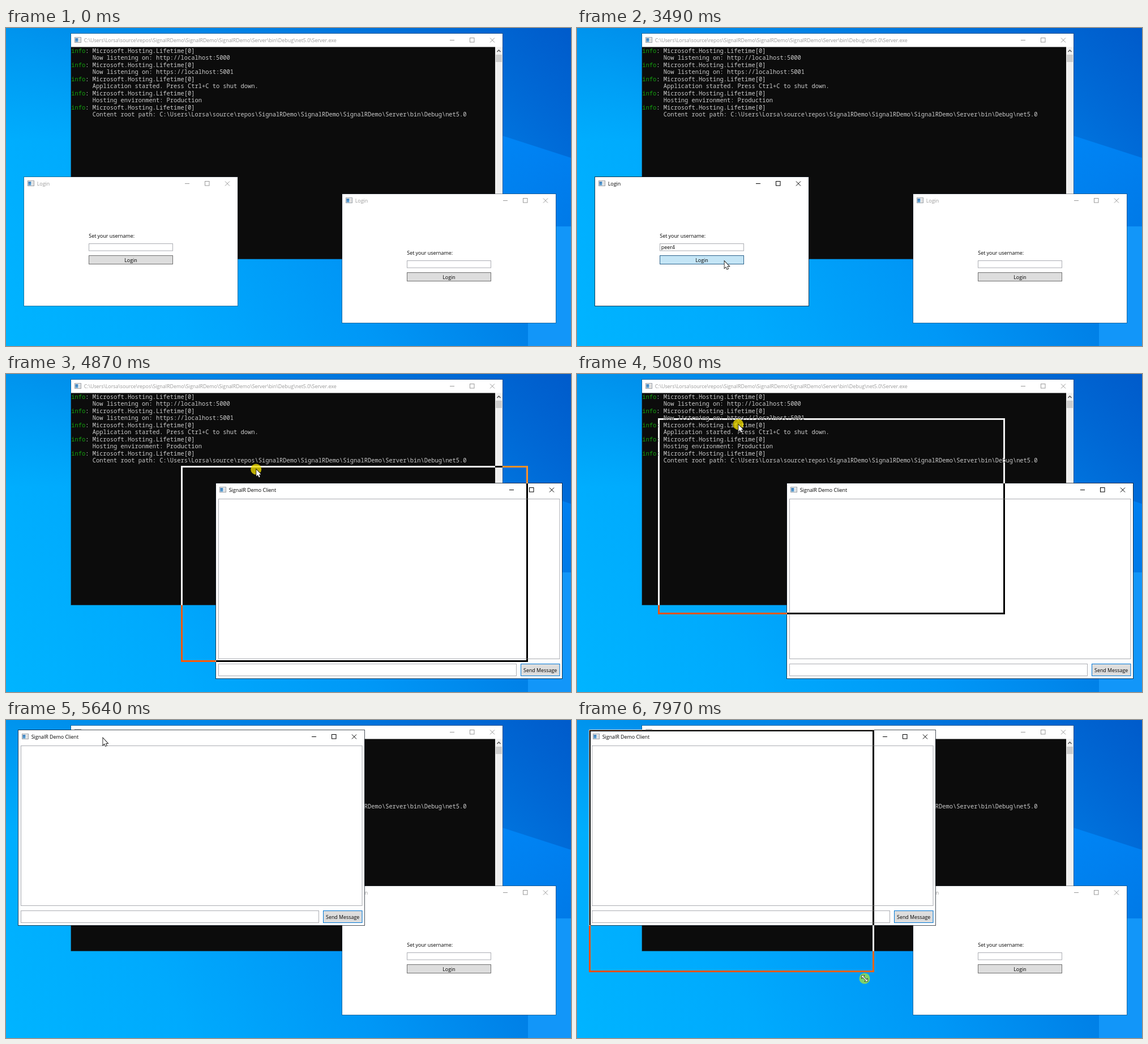
Recreate the animation shown at these times as an HTML page with a canvas. Size 998 by 561 pixels, loop 8 s.

```html
<!DOCTYPE html>
<html lang="en">
<head>
<meta charset="utf-8">
<title>SignalR demo</title>
<style>
html, body { margin: 0; width: 100%; height: 100%; overflow: hidden; background: #00a0f5; }
canvas { display: block; }
</style>
</head>
<body>
<canvas id="stage" width="998" height="561"></canvas>
<script>
const W = 998, H = 561, LOOP = 8000;
const ctx = document.getElementById('stage').getContext('2d');
const UI = '8.88px "Open Sans", "Noto Sans", sans-serif';
const MONO = '10.4px "Noto Sans Mono", "DejaVu Sans Mono", monospace';
const ROOT = 'C:\\Users\\Lorsa\\source\\repos\\' + 'SignalRDemo\\'.repeat(3) + 'Server\\bin\\Debug\\net5.0';
const LOG = [
  'Now listening on: http://localhost:5000',
  'Now listening on: https://localhost:5001',
  'Application started. Press Ctrl+C to shut down.',
  'Hosting environment: Production',
  'Content root path: ' + ROOT
];
const USER = 'peer4', KEY_GAP = 197;

// Moments of the story, in ms
const ENTER = 430, FOCUS = 1170, TYPE = 1840, WAKE = 2910, PRESS = 3490, CLOSE = 3690,
  SHOWN = 3790, GRAB = 4790, DROP = 5620, CORNER = 6440, HOLD = 7650, RESIZE = 7780, END = 7970;

const smooth = u => u * u * (3 - 2 * u);
const easeOut = u => u * (2 - u);
const progress = (t, a, b) => Math.min(1, Math.max(0, (t - a) / (b - a)));
const mix = (a, b, k) => a + (b - a) * k;

const HOME = { x: 371, y: 193 }, PARKED = { x: 22, y: 18 };
const SIZE = { w: 611, h: 344 };
const MOVES = [
  { from: ENTER, to: 1100, x: 236, y: 392 },
  { from: WAKE, to: 3140, x: 260, y: 411 },
  { from: 3980, to: 4700, x: 519, y: 207 },
  { from: GRAB, to: 5470, x: 170, y: 31, ease: easeOut },
  { from: DROP, to: CORNER, x: 634, y: 364 },
  { from: RESIZE, to: END, x: 508, y: 456 }
];

function pointerAt(t) {
  let x = 942, y = 562;
  for (const m of MOVES) {
    const k = (m.ease || smooth)(progress(t, m.from, m.to));
    x = mix(x, m.x, k);
    y = mix(y, m.y, k);
  }
  return [x, y];
}

function fill(x, y, w, h, color) {
  ctx.fillStyle = color;
  ctx.fillRect(x, y, w, h);
}

function box(x, y, w, h, back, edge) {
  fill(x, y, w, h, back);
  ctx.strokeStyle = edge;
  ctx.lineWidth = 1;
  ctx.strokeRect(x + .5, y + .5, w - 1, h - 1);
}

function text(s, x, y, color = '#000', font = UI, align = 'left') {
  ctx.font = font;
  ctx.textAlign = align;
  ctx.fillStyle = color;
  ctx.fillText(s, x, y);
}

function lines(points, color, width, closed) {
  ctx.beginPath();
  for (const [x, y] of points) ctx.lineTo(x, y);
  if (closed) ctx.closePath();
  ctx.strokeStyle = color;
  ctx.lineWidth = width;
  ctx.stroke();
}

function gradient(x0, y0, x1, y1, ...colors) {
  const g = ctx.createLinearGradient(x0, y0, x1, y1);
  colors.forEach((c, i) => g.addColorStop(i / (colors.length - 1), c));
  return g;
}

function desktop() {
  fill(0, 0, W, H, gradient(0, H, W, 0, '#00b4ff', '#00aafd', '#0097f6', '#007ce4', '#005fcf'));
  fill(0, 0, W, 200, gradient(0, 0, 0, 200, 'rgba(0,80,190,.25)', 'rgba(0,80,190,0)'));
  ctx.beginPath();
  ctx.moveTo(600, 101);
  ctx.lineTo(W, 229);
  ctx.lineTo(W, 500);
  ctx.lineTo(600, 500);
  ctx.fillStyle = gradient(0, 190, 0, 500, 'rgba(0,140,255,.7)', 'rgba(0,140,255,0)');
  ctx.fill();
  fill(922, 350, 76, 211, '#1296f9');
}

// The thin border lies just outside the white window area
function frame(x, y, w, h, title, active) {
  const ink = active ? '#000' : '#999';
  fill(x, y, w, h, '#fff');
  ctx.strokeStyle = active ? 'rgba(15,25,35,.75)' : 'rgba(40,50,60,.45)';
  ctx.lineWidth = 1;
  ctx.strokeRect(x - .5, y - .5, w + 1, h + 1);
  box(x + 6, y + 6, 12, 10, '#f4f4f4', '#9a9fa5');
  fill(x + 7.5, y + 8, 5, 6.5, gradient(x + 7, y + 8, x + 12, y + 14, '#2f6fb0', '#63a8d8'));
  fill(x + 14, y + 8, 2.5, 6.5, '#dcdcdc');
  text(title, x + 22.7, y + 15, ink);
  const r = x + w, m = y + 11.5;
  lines([[r - 93, m], [r - 85, m]], ink, 1);
  ctx.strokeRect(r - 57.5, m - 4, 7.5, 7.5);
  lines([[r - 22, m - 4], [r - 14, m + 4]], ink, 1);
  lines([[r - 14, m - 4], [r - 22, m + 4]], ink, 1);
}

function server() {
  frame(115, 10, 762, 397, ROOT + '\\Server.exe', false);
  fill(115, 33.5, 749, 374, '#0c0c0c');
  fill(864, 33.5, 13, 374, '#f0f0f0');
  fill(865, 47, 11, 13, '#cdcdcd');
  lines([[867.5, 42], [870.5, 39], [873.5, 42]], '#505050', 1.4);
  LOG.forEach((line, i) => {
    const y = 43.8 + i * 25;
    text('info', 115.3, y, '#13a10e', MONO);
    text(': Microsoft.Hosting.Lifetime[0]', 140.2, y, '#ccc', MONO);
    text(line, 152.7, y + 12.5, '#ccc', MONO);
  });
}

function login(x, y, s = {}) {
  frame(x, y, 377, 227, 'Login', s.active);
  text('Set your username:', x + 114.3, y + 107);
  box(x + 114, y + 117, 149, 13.5, '#fff', s.focus ? '#569de5' : s.over ? '#7eb4ea' : '#abadb3');
  const name = s.name || '';
  text(name, x + 116.8, y + 127.2);
  if (s.caret) fill(Math.round(x + 117 + ctx.measureText(name).width), y + 119, 1, 10, '#000');
  const [back, edge] = s.pressed ? ['#c4e5f6', '#2c628b']
    : s.hover ? ['#bee6fd', '#3c7fb1']
    : ['#ddd', s.focus ? '#0078d7' : '#707070'];
  box(x + 114, y + 138, 149, 16, back, edge);
  text('Login', x + 188.5, y + 150, '#000', UI, 'center');
}

function client({ x, y }) {
  frame(x, y, SIZE.w, SIZE.h, 'SignalR Demo Client', true);
  box(x + 4, y + 27, 603.5, 283, '#fff', '#abadb3');
  box(x + 4, y + 318, 527, 22, '#fff', '#abadb3');
  box(x + 538, y + 318, 69.5, 22, '#ddd', '#0078d7');
  text('Send Message', x + 572.7, y + 332.7, '#000', UI, 'center');
}

// Inverts whatever lies below, like the system's drag outline
function outline(left, top, right, bottom) {
  const [l, t, r, b] = [left, top, right, bottom].map(Math.round);
  ctx.save();
  ctx.globalCompositeOperation = 'difference';
  ctx.strokeStyle = '#fff';
  ctx.lineWidth = 3;
  ctx.strokeRect(l + .5, t + .5, r - l - 1, b - t - 1);
  ctx.restore();
}

function halo(x, y, color) {
  ctx.beginPath();
  ctx.arc(x, y, 9.5, 0, Math.PI * 2);
  ctx.fillStyle = color;
  ctx.fill();
}

function shape(points, edge) {
  lines(points, '#000', edge, true);
  ctx.fillStyle = '#fff';
  ctx.fill();
}

const cursors = {
  arrow() {
    shape([[.5, .5], [.5, 12.5], [3.2, 10], [5.1, 14.4], [7, 13.6], [5.2, 9.3], [8.8, 9.3]], 1.6);
  },
  beam() {
    lines([[0, -5.5], [0, 5.5]], '#000', 1);
    for (const y of [-5.5, 5.5]) lines([[-2.5, y], [2.5, y]], '#000', 1);
  },
  resize() {
    ctx.rotate(Math.PI / 4);
    const half = [[-7, 0], [-4, -3], [-4, -.8], [4, -.8], [4, -3]];
    shape([...half, ...half.map(([x, y]) => [-x, -y])], 1.2);
  }
};

function pointer(kind, x, y) {
  ctx.save();
  ctx.translate(x, y);
  cursors[kind]();
  ctx.restore();
}

function draw(t) {
  const [px, py] = pointerAt(t);
  const inside = t < CLOSE && px > 146 && px < 295;
  const overBox = inside && py > 380 && py < 394;
  const overButton = inside && py > 401 && py < 417;
  const typed = Math.min(USER.length, Math.max(0, Math.floor((t - TYPE) / KEY_GAP) + 1));
  const focus = t >= FOCUS && t < PRESS;
  const lastKey = typed ? TYPE + (typed - 1) * KEY_GAP : FOCUS;

  desktop();
  server();
  login(594, 293);
  if (t < CLOSE) {
    login(32, 263, {
      active: t >= FOCUS,
      focus,
      over: overBox,
      hover: overButton,
      pressed: t >= PRESS,
      name: USER.slice(0, typed),
      caret: focus && (t - lastKey) % 1060 < 530
    });
  } else {
    ctx.globalAlpha = mix(.4, 1, progress(t, CLOSE, SHOWN));
    client(t < DROP ? HOME : PARKED);
    ctx.globalAlpha = 1;
  }

  // The outline starts a little after the pointer
  if (t >= GRAB + 20 && t < DROP) {
    const k = easeOut(progress(t, GRAB + 20, 5470));
    const x = mix(HOME.x, PARKED.x, k), y = mix(HOME.y, PARKED.y, k);
    outline(x, y, x + SIZE.w, y + SIZE.h);
  }
  if (t >= RESIZE + 30) {
    const k = smooth(progress(t, RESIZE, END));
    outline(PARKED.x, PARKED.y, mix(633, 524, k), mix(362, 444, k));
  }

  if (t >= GRAB - 30 && t < DROP) halo(px, py, 'rgba(240,220,0,.78)');
  if (t >= HOLD) halo(px, py, 'rgba(150,220,80,.85)');
  const hidden = t < ENTER || (t >= TYPE && t < WAKE);
  if (!hidden) pointer(t >= CORNER ? 'resize' : overBox ? 'beam' : 'arrow', px, py);
}

let start;
function tick(now) {
  if (start === undefined) start = now;
  draw((now - start) % LOOP);
  requestAnimationFrame(tick);
}
draw(0);
requestAnimationFrame(tick);
</script>
</body>
</html>
```
